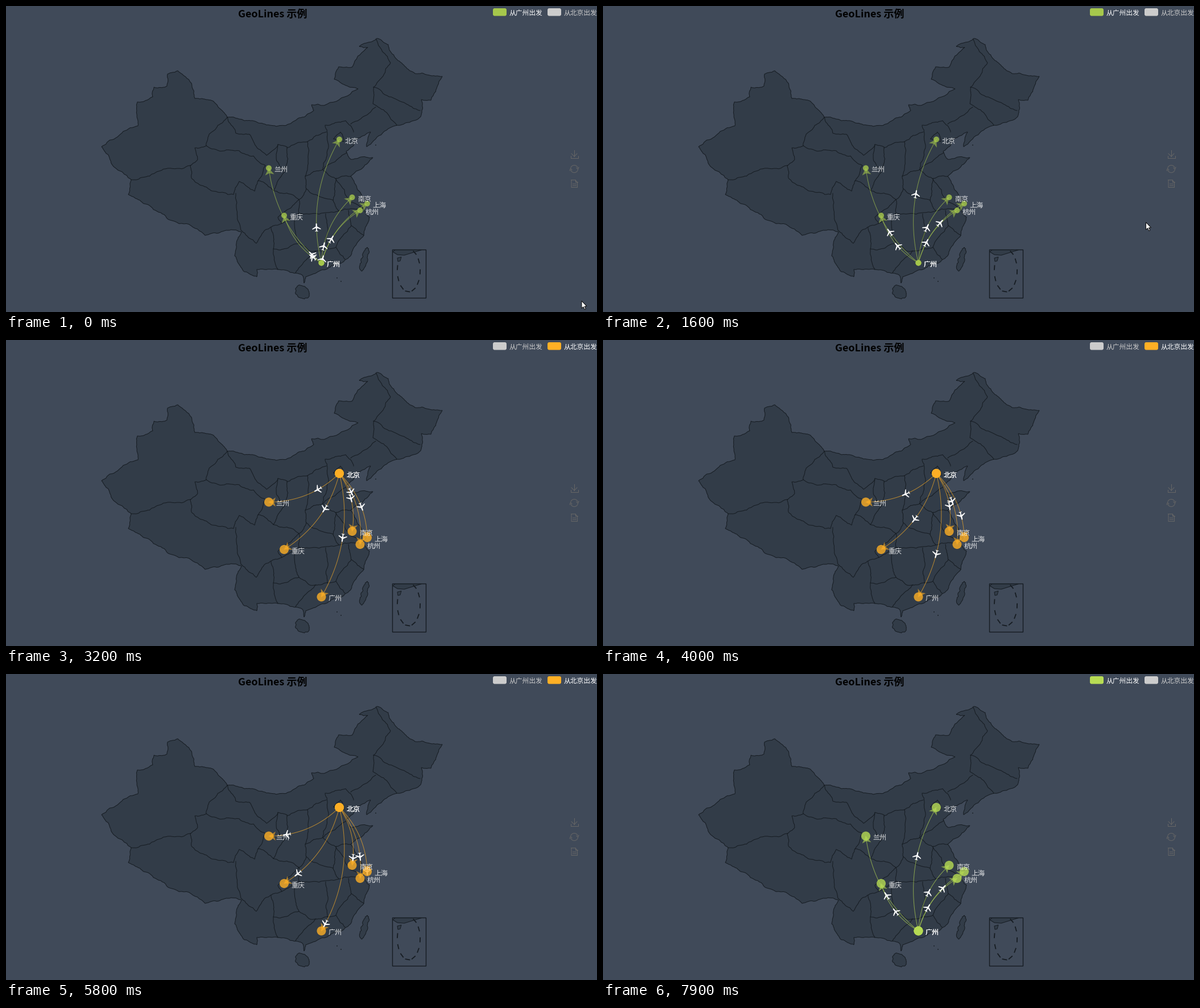
A matplotlib script for the animation above (8 s loop, 1039 by 539 pixels).

```python
import numpy as np
import matplotlib.pyplot as plt
from matplotlib.animation import FuncAnimation
from matplotlib.patches import Arc, Circle, FancyBboxPatch, Polygon, Rectangle

W, H, DPI = 1039, 539, 100
STEP, LOOP = 100, 8000
PX = 72 / DPI  # points per pixel
GREEN, ORANGE, GREY = (166, 200, 76), (255, 160, 34), (204, 204, 204)
LAND, EDGE = "#323c48", "#161c22"

plt.rcParams["font.family"] = "Noto Sans CJK JP"
plt.rcParams["toolbar"] = "None"
fig = plt.figure(figsize=((W + .01) / DPI, (H + .01) / DPI), dpi=DPI, facecolor="#404a59")
ax = fig.add_axes([0, 0, 1, 1])
ax.set(xlim=(0, W), ylim=(H, 0))
ax.axis("off")
rng = np.random.default_rng(7)


def line(pts, color, width=1, z=2, **kw):
    x, y = np.asarray(pts, float).T
    return ax.plot(x, y, color=color, lw=width * PX, zorder=z, **kw)[0]


def shape(pts, fill, edge="none", width=1, z=1, **kw):
    return ax.add_patch(Polygon(pts, fc=fill, ec=edge, lw=width * PX, zorder=z, **kw))


def label(x, y, s, size=12, color="white", z=6, **kw):
    return ax.text(x, y, s, fontsize=size * PX, color=color, va="center_baseline", zorder=z, **kw)


def rough(pts, levels=4, amount=.1):
    """Fractal polyline: midpoints are pushed sideways by a random share of the length."""
    pts = np.array(pts, float)
    for _ in range(levels):
        a, b = pts[:-1], pts[1:]
        side = np.stack([a[:, 1] - b[:, 1], b[:, 0] - a[:, 0]], 1)
        mid = (a + b) / 2 + side * rng.uniform(-amount, amount, (len(a), 1))
        pts = np.insert(pts, np.arange(1, len(pts)), mid, axis=0)
    return pts


def border(*pts):
    line(rough(pts), EDGE)


def island(x, y, rx, ry, lean=0):
    a = np.linspace(0, 2 * np.pi, 13)
    ring = np.stack([x + rx * np.cos(a) - lean * ry * np.sin(a), y + ry * np.sin(a)], 1)
    shape(rough(ring, 2, .2), LAND, EDGE)


def draw_map():
    inland = [(220, 306), (187, 280), (168, 248), (183, 236), (232, 211), (231, 169), (258, 160),
              (260, 143), (283, 141), (284, 120), (302, 114), (326, 136), (332, 163), (365, 168),
              (389, 196), (430, 202), (475, 212), (508, 202), (541, 184), (537, 174), (619, 146),
              (577, 129), (585, 107), (608, 108), (636, 73), (621, 71), (652, 57), (672, 68),
              (685, 92), (719, 119), (767, 124), (747, 166), (730, 165), (729, 195), (688, 210)]
    coast = [(634, 248), (641, 222), (618, 233), (598, 256), (606, 270), (645, 267), (606, 300),
             (637, 343), (628, 356), (639, 372), (629, 404), (605, 441), (570, 460), (527, 477),
             (524, 488), (521, 474), (494, 466)]
    south = [(441, 464), (441, 477), (419, 468), (402, 440), (414, 398), (396, 394), (350, 404),
             (288, 377), (242, 348), (215, 332), (220, 306)]
    shape(rough(inland + coast + south), LAND, EDGE)
    island(521, 504, 12, 12, -.3)
    island(630, 446, 6, 21, .25)
    for x, y in ((582, 479), (589, 485), (650, 245)):
        ax.add_patch(Circle((x, y), .9, fc=EDGE, zorder=2))

    # west
    border((389, 196), (357, 226), (352, 246), (332, 250), (337, 270), (324, 281))
    border((220, 306), (262, 294), (324, 281))
    border((324, 281), (326, 303), (360, 325), (400, 332), (410, 309), (437, 326), (443, 308))
    border((352, 246), (410, 255), (456, 281), (443, 308), (470, 325))
    border((389, 196), (404, 224), (428, 226), (458, 263), (478, 244), (494, 248), (490, 290),
           (470, 325))
    border((478, 244), (476, 273), (490, 290))
    border((404, 330), (413, 395), (440, 418), (455, 395), (485, 383))
    # north
    border((494, 250), (530, 239), (563, 222))
    border((530, 239), (526, 300), (557, 288))
    border((611, 222), (597, 202), (561, 210), (567, 245), (557, 288), (599, 258))
    border((576, 234), (588, 222), (594, 239), (576, 234))
    border((606, 208), (650, 178))
    border((650, 58), (676, 100), (646, 143), (703, 172), (728, 184))
    border((646, 143), (645, 172), (687, 210))
    # centre and south
    border((557, 288), (580, 304), (606, 300))
    border((526, 300), (528, 322), (575, 342), (585, 361))
    border((575, 342), (580, 304), (606, 345), (628, 356))
    border((470, 325), (515, 341), (528, 322))
    border((515, 341), (478, 372), (485, 383), (515, 365), (515, 341))
    border((515, 365), (585, 361), (628, 356))
    border((562, 366), (565, 428))
    border((602, 360), (607, 387), (580, 425))
    border((607, 387), (629, 404))
    border((596, 446), (580, 425), (535, 432), (515, 418), (470, 428), (466, 390))
    border((508, 371), (515, 418))
    border((470, 428), (478, 464))
    border((545, 431), (509, 470))


def draw_inset():
    ax.add_patch(Rectangle((678.8, 429.3), 59, 85, fc="none", ec=EDGE, lw=1.4 * PX, zorder=2))
    shape([(680, 433), (684, 429.5), (731, 429.5), (700, 439), (688, 438)], LAND, EDGE)
    shape([(688, 444), (695, 442), (693, 449), (689, 450)], LAND, EDGE)
    for a in np.radians(np.linspace(-58, 188, 9)):
        pos = np.array([708 + 20 * np.cos(a), 466 + 37 * np.sin(a)])
        way = np.array([-20 * np.sin(a), 37 * np.cos(a)])
        way *= 3.5 / np.hypot(*way)
        line([pos - way, pos + way], EDGE, 1.8)


def draw_toolbox():
    ink = "#666666"
    line([(999, 254), (999, 265)], ink)
    line([(994, 260), (999, 265), (1004, 260)], ink)
    line([(992.5, 264), (992.5, 268.5), (1005.5, 268.5), (1005.5, 264)], ink)
    for a in (15, 195):
        ax.add_patch(Arc((999, 287), 13, 13, theta1=a, theta2=a + 150, ec=ink, lw=PX))
    for s in (1, -1):
        line([(999 + 4 * s, 287 - 2 * s), (999 + 6.5 * s, 287 + s), (999 + 8 * s, 287 - 3 * s)], ink)
    line([(994, 306.5), (1000.5, 306.5), (1004.5, 310.5), (1004.5, 319.5), (994, 319.5),
          (994, 306.5)], ink)
    line([(1000.5, 306.5), (1000.5, 310.5), (1004.5, 310.5)], ink)
    for y in (313.5, 316.5):
        line([(996, y), (1002, y)], ink)


CITIES = {"上海": (635, 348), "北京": (586, 235), "广州": (554.5, 452.5), "南京": (608.5, 337),
          "重庆": (489, 369), "兰州": (462, 285.5), "杭州": (622.5, 360)}
PERIOD = 6000
TO_ORANGE, TO_GREEN = 2900, 6600
HALF_PLANE = [(0, -1), (.13, -.9), (.166, -.235), (1, .28), (1, .49), (.14, .12), (.108, .68),
              (.458, .95), (0, .9)]
PLANE = 7.5 * np.array(HALF_PLANE + [(-x, y) for x, y in HALF_PLANE[-2:0:-1]])
ARROW = np.array([(0, 0), (8, 12), (0, 9), (-8, 12)])
CURSOR = np.array([(0, 0), (0, 13), (3, 10.3), (5.2, 15), (7.2, 14), (5, 9.6), (9, 9.4)])


def curve(a, b, u):
    """Position and heading at u on the quadratic arc from a to b."""
    a, b = np.array(a), np.array(b)
    d = b - a
    c = (a + b) / 2 + .2 * np.array([d[1], -d[0]])
    u = np.asarray(u, float)[..., None]
    pos = (1 - u) ** 2 * a + 2 * u * (1 - u) * c + u ** 2 * b
    way = (1 - u) * (c - a) + u * (b - c)
    return pos, way / np.linalg.norm(way, axis=-1, keepdims=True)


def oriented(pts, pos, way):
    return pos - pts[:, 1:] * way + pts[:, :1] * np.array([-way[1], way[0]])


def tint(rgb, lit):
    return tuple(min(v * (1.1 if lit else 1), 255) / 255 for v in rgb)


def draw_routes(ms, hub, rgb, start, lit):
    color = tint(rgb, lit)
    radius = 8 if lit else 5
    targets = [city for city in CITIES if city != hub]
    art = []
    for i, city in enumerate(targets):
        ends = CITIES[hub], CITIES[city]
        u = (ms - start - i * PERIOD / 18) / PERIOD % 1
        art.append(line(curve(*ends, np.linspace(0, 1, 40))[0], color, 1, 3, alpha=.65))
        art.append(shape(oriented(ARROW, *curve(*ends, 1)), color, z=3, alpha=.58))
        art.append(shape(oriented(PLANE, *curve(*ends, u)), "white", z=3.5))
    for city in targets + [hub] * 3:
        x, y = CITIES[city]
        art.append(ax.add_patch(Circle((x, y), radius, fc=color, ec="none", alpha=.8, zorder=4)))
        art.append(label(x + radius + 4.5, y + 1.5, city, alpha=.85))
    return art


def draw_legend(x, name, rgb, active, lit):
    box = FancyBboxPatch((x + 3, 7), 18, 7.5, boxstyle="round,pad=3,rounding_size=3",
                         fc=tint(rgb if active else GREY, lit), ec="none", zorder=5)
    ink = "white" if active else "#cccccc"
    return [ax.add_patch(box), label(x + 28.2, 11, name, 11.7, ink)]


def draw_cursor(ms):
    if ms >= 1900:  # the pointer hides while it rests on the legend
        return []
    keys = [0, 900, 1600, 1800]
    x = np.interp(ms, keys, [1012, 997, 954.5, 957])
    y = np.interp(ms, keys, [519.5, 519.5, 381, 125])
    return [shape(CURSOR + (x, y), "white", "black", .9, 9)]


live = []


def update(i):
    ms = i * STEP
    while live:
        live.pop().remove()
    orange = TO_ORANGE <= ms < TO_GREEN
    lit_orange = 2000 <= ms < TO_ORANGE or 3200 <= ms < 6000
    lit_green = 6100 <= ms < TO_GREEN or ms >= 7100
    if orange:
        live.extend(draw_routes(ms, "北京", ORANGE, -173, lit_orange))
    else:
        live.extend(draw_routes(ms, "广州", GREEN, -1983, lit_green))
    live.extend(draw_legend(856, "从广州出发", GREEN, not orange, lit_green))
    live.extend(draw_legend(952, "从北京出发", ORANGE, orange, lit_orange))
    live.extend(draw_cursor(ms))
    return live


draw_map()
draw_inset()
draw_toolbox()
label(408, 13, "GeoLines 示例", 18, "black", weight="bold")
anim = FuncAnimation(fig, update, frames=LOOP // STEP, interval=STEP, init_func=lambda: [],
                     repeat=True, repeat_delay=0, blit=False)
plt.show()
```
